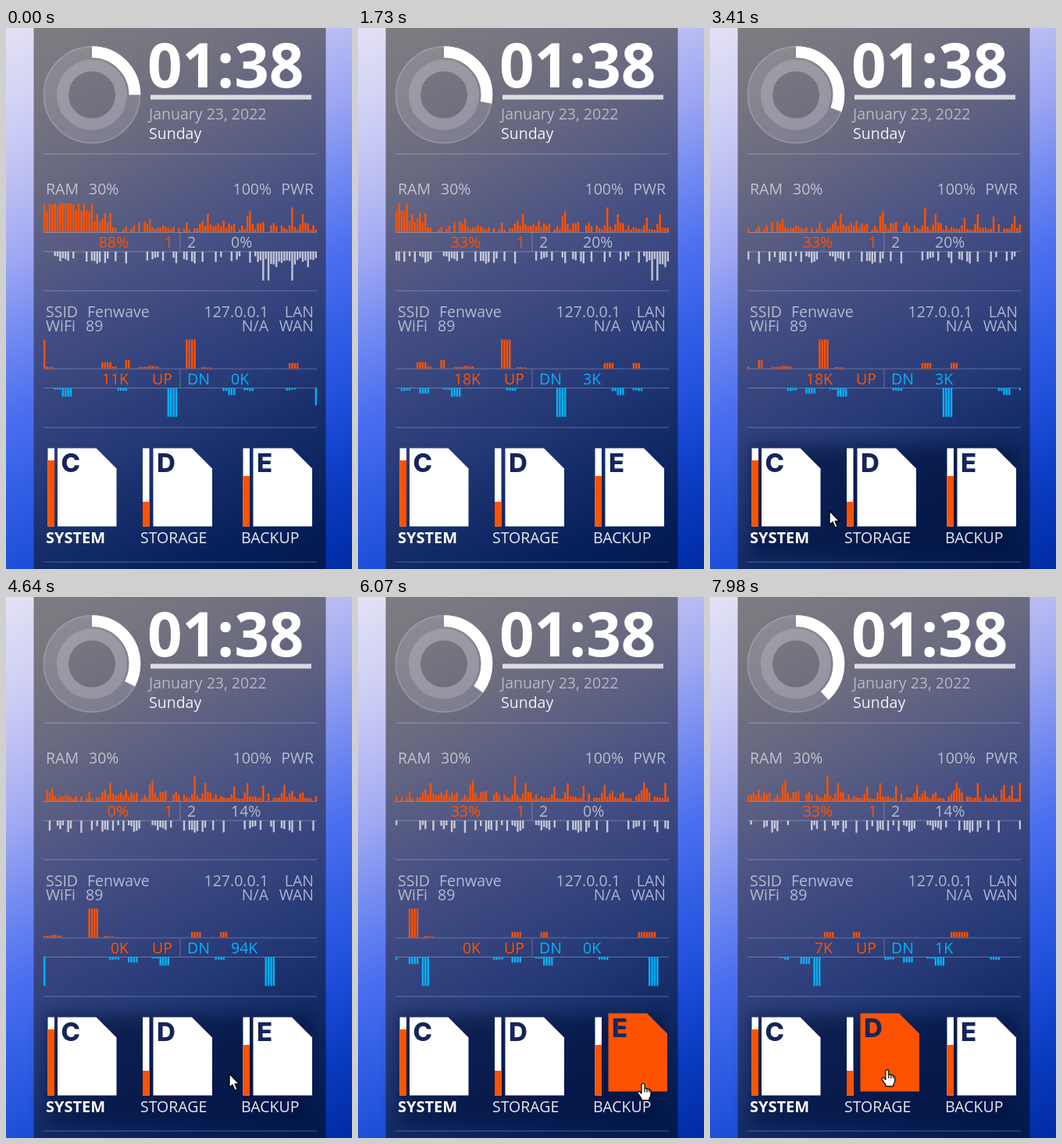
Recreate the animation shown at these times as an HTML page with a canvas. Size 443 px wide and 692 px high, loop 8000 ms.

```html
<!DOCTYPE html>
<html lang="en">
<head>
<meta charset="utf-8">
<title>Desktop panel</title>
<style>
html, body { margin: 0; width: 100%; height: 100%; overflow: hidden; background: #4a6cf0; }
canvas { display: block; width: 443px; height: 692px; }
</style>
</head>
<body>
<canvas id="stage" width="443" height="692"></canvas>
<script>
const W = 443, H = 692, LOOP = 8000;
const ctx = document.getElementById('stage').getContext('2d');
const ORANGE = '#ff5200', CYAN = '#06b2f5';
const SOFT = 'rgba(255,255,255,.6)', BRIGHT = 'rgba(255,255,255,.9)', LINE = 'rgba(255,255,255,.27)';
const FONT = '"Open Sans", "Noto Sans", sans-serif';

// Graph layout: bars move one slot per tick.
const LEFT = 48, PITCH = 3.375, COUNT = 104, TICK = 124.5, PHASE = 62, TALL = 37;

const rnd = (n, seed) => {
  const v = Math.sin(n * 127.1 + seed * 311.7) * 43758.5453;
  return v - Math.floor(v);
};

// Busy at first, then a low floor with rare spikes.
function coreOne(n) {
  const r = rnd(n, 1);
  if (n < 24) return Math.min(TALL, (n < 19 ? 25 : 11) + 16 * r);
  const spike = rnd(n, 4) < .13 ? 8 + 13 * rnd(n, 6) : 0;
  return r < .08 ? 0 : 3 + 10 * r * r + spike;
}
// Small groups with gaps, dense at the far right.
function coreTwo(n) {
  const r = rnd(n, 2);
  if (n > 81) return rnd(n, 7) < .15 ? TALL : 8 + 12 * r;
  const gap = rnd(Math.floor(n / 4), 5) < .6 ? .4 : .8;
  return r < gap ? 0 : 5 + 11 * rnd(n, 3);
}

// Network traffic: a few bursts [x, bars, height] over small random blips.
function traffic(bursts, seed) {
  return n => {
    const x = LEFT + n * PITCH;
    const hit = bursts.find(([from, bars]) => x > from - 1.7 && x < from + bars * PITCH - 1.7);
    if (hit) return hit[2];
    return rnd(Math.floor(n / 4), seed) < .22 ? 1 + 3 * rnd(Math.floor(n / 2), seed + 1) : 0;
  };
}
const upload = traffic([[48, 1, TALL], [123, 4, 8], [153, 2, 11], [229, 4, TALL],
  [363, 4, 7], [399, 3, 7], [523, 7, 7]], 21);
const download = traffic([[-101, 4, 9], [-84, 3, TALL], [30, 4, 7], [70, 4, 11],
  [205, 4, TALL], [284, 3, 9], [397, 1, 22]], 31);

// Readouts take the next value on every tick.
const cycle = (list, step) => list[step % list.length];
const readouts = {
  one: [88, 33, 14, 50, 0, 25, 33, 100, 50, 20, 33, 0, 33],
  two: [0, 20, 14, 33, 0, 14, 0, 25, 33, 20, 0, 14, 14],
  up: [11, 18, 0, 1, 0, 3, 0, 3, 1, 0, 0, 0, 7],
  down: [0, 3, 0, 1, 0, 0, 2, 0, 1, 0, 0, 94, 1]
};

// Pointer path: time, x, y.
const path = [[2250, 47, 696], [2450, 54, 668], [3410, 153, 618], [4640, 286, 610],
  [6070, 365, 622], [6500, 368, 629], [8000, 225, 604]];
function pointerAt(t) {
  if (t < path[0][0]) return null;
  const i = path.findIndex(p => p[0] > t);
  const [t0, x0, y0] = path[i - 1], [t1, x1, y1] = path[i];
  const k = (t - t0) / (t1 - t0);
  return { x: x0 + (x1 - x0) * k, y: y0 + (y1 - y0) * k };
}

const drives = [
  { letter: 'C', bar: 53.5, x: 66, level: 553, label: 'SYSTEM', lx: 51, bold: true },
  { letter: 'D', bar: 175, x: 188.5, level: 606, label: 'STORAGE', lx: 172 },
  { letter: 'E', bar: 303.5, x: 316.5, level: 573, label: 'BACKUP', lx: 301 }
];
const FILE_W = 75.5, FILE_H = 100, CUT = 26;

function rect(x, y, w, h, fill) {
  ctx.fillStyle = fill;
  ctx.fillRect(x, y, w, h);
}
function text(str, x, y, fill = SOFT, align = 'left', font = '19.5px ' + FONT) {
  ctx.font = font;
  ctx.textAlign = align;
  ctx.fillStyle = fill;
  ctx.fillText(str, x, y);
}
const textRight = (str, x, y, fill = SOFT) => text(str, x, y, fill, 'right');
function poly(points, fill) {
  ctx.beginPath();
  points.forEach(([x, y]) => ctx.lineTo(x, y));
  ctx.closePath();
  ctx.fillStyle = fill;
  ctx.fill();
}

// Diagonal gradient whose value grows as y + x / 2.
function slant(colors) {
  const g = ctx.createLinearGradient(0, 0, 361.6, 723.2);
  colors.forEach((c, i) => g.addColorStop(i / (colors.length - 1), c));
  return g;
}
const wall = slant(['#e3e1f4', '#d3d3f5', '#bdbff3', '#9ea7f2', '#718af0',
  '#4b6ef0', '#315ee5', '#1d4dd8', '#093abf', '#022ca8']);
const glass = slant(['#817d82', '#787680', '#6c6c80', '#5a5e82', '#475083',
  '#37457e', '#263a77', '#142c68', '#08205a', '#00184e']);

function background(t) {
  rect(0, 0, W, H, wall);
  rect(35.5, 0, 374, H, glass);
  const shade = Math.max(0, Math.min(1, (t - 1900) / 350));
  if (shade) {
    // Only the soft shadow of an off-stage box is seen.
    ctx.save();
    ctx.shadowColor = `rgba(0,16,58,${.6 * shade})`;
    ctx.shadowBlur = 20;
    ctx.shadowOffsetX = 1000;
    rect(52 - 1000, 534, 341, 142, '#000');
    ctx.restore();
  }
  for (const y of [161, 336, 511, 683]) rect(48, y - .5, 350, 1, LINE);
}

function ring(inner, outer, from, to, color) {
  ctx.beginPath();
  ctx.arc(110, 85.5, (inner + outer) / 2, from, to);
  ctx.lineWidth = outer - inner;
  ctx.strokeStyle = color;
  ctx.stroke();
}
function clock(t) {
  const full = Math.PI * 2, top = -Math.PI / 2;
  ring(30, 45, 0, full, 'rgba(255,255,255,.27)');
  ring(45, 62, 0, full, 'rgba(255,255,255,.12)');
  ring(60.5, 62.5, 0, full, 'rgba(255,255,255,.16)');
  ring(47.5, 62.3, top, top + full * (15 + t / 1000) / 60, '#fff');
  text('01:38', 181, 75.5, '#fff', 'left', 'bold 78px ' + FONT);
  rect(185, 85.5, 206, 6, 'rgba(255,255,255,.76)');
  text('January 23, 2022', 183, 117, 'rgba(255,255,255,.53)');
  text('Sunday', 183, 142, BRIGHT);
}

// dir 1 scrolls right and hangs down, dir -1 scrolls left and stands up.
function graph(step, height, base, dir, color) {
  for (let i = 0; i < COUNT; i++) {
    const h = height(i - dir * step);
    rect(LEFT + i * PITCH, dir > 0 ? base : base - h, 2.4, h, color);
  }
}
function axes(upper, lower) {
  rect(48, upper, 350, 1, LINE);
  rect(48, lower, 350, 1, LINE);
  rect(222.5, upper + 1, 1, lower - upper - 1, LINE);
}

function cpu(step) {
  text('RAM', 51, 213);
  text('30%', 106, 213);
  textRight('100%', 340, 213);
  textRight('PWR', 394, 213);
  axes(261, 285.5);
  graph(step, coreOne, 261, -1, ORANGE);
  graph(step, coreTwo, 286, 1, 'rgba(255,255,255,.68)');
  textRight(cycle(readouts.one, step) + '%', 157, 281, ORANGE);
  textRight('1', 214, 281, ORANGE);
  text('2', 232, 281);
  text(cycle(readouts.two, step) + '%', 288, 281);
}

function network(step) {
  text('SSID', 51, 370);
  text('Fenwave', 104, 370);
  textRight('127.0.0.1', 336, 370);
  textRight('LAN', 394, 370);
  text('WiFi', 51, 388);
  text('89', 102, 388);
  textRight('N/A', 336, 388);
  textRight('WAN', 394, 388);
  axes(435.5, 460);
  graph(step, upload, 435.5, -1, ORANGE);
  graph(step, download, 460.5, 1, CYAN);
  textRight(cycle(readouts.up, step) + 'K', 157, 456, ORANGE);
  textRight('UP', 213, 456, ORANGE);
  text('DN', 232, 456, CYAN);
  text(cycle(readouts.down, step) + 'K', 288, 456, CYAN);
}

const over = (d, p) => p && p.x >= d.bar && p.x <= d.x + FILE_W && p.y > 537 && p.y < 637;

function drive(d, hot) {
  rect(d.bar, 537.5, 8.5, FILE_H, '#fff');
  rect(d.bar, d.level, 8.5, 637.5 - d.level, ORANGE);
  const x = d.x + (hot ? 4 : 0), y = hot ? 532.5 : 537.5, right = x + FILE_W;
  poly([[x, y], [right - CUT, y], [right, y + CUT], [right, y + FILE_H], [x, y + FILE_H]],
    hot ? ORANGE : '#fff');
  text(d.letter, x + 4.5, y + 30.5, '#14265a', 'left', '800 33px Inter, Roboto, sans-serif');
  text(d.label, d.lx, 659, d.bold ? '#fff' : BRIGHT, 'left', (d.bold ? 'bold 20px ' : '19.5px ') + FONT);
}

const arrowShape = new Path2D('M0 0V17.5L4 13.8L7 21L10 19.7L7 12.8H12.5Z');
const handShape = new Path2D('M-2 1.5Q0 -1 2 1.5V7Q4 5.5 5 7.5Q7 6.5 8 8.5Q10 8 10 10.5V14' +
  'Q10 17 8 19V21.5H-2V19.5L-6.5 13Q-7.5 10 -4.5 10.5L-2 13Z');
function pointer(p, hand) {
  ctx.save();
  ctx.translate(p.x, p.y);
  const shape = hand ? handShape : arrowShape;
  ctx.lineJoin = 'round';
  ctx.lineWidth = 1.2;
  ctx.fillStyle = '#fff';
  ctx.strokeStyle = '#000';
  ctx.fill(shape);
  ctx.stroke(shape);
  if (hand) {
    ctx.beginPath();
    for (const x of [2, 5, 8]) {
      ctx.moveTo(x, 7.5);
      ctx.lineTo(x, 11.5);
    }
    ctx.stroke();
  }
  ctx.restore();
}

function draw(t) {
  const step = Math.floor((t + PHASE) / TICK), p = pointerAt(t);
  background(t);
  clock(t);
  cpu(step);
  network(step);
  drives.forEach(d => drive(d, over(d, p)));
  if (p) pointer(p, drives.some(d => over(d, p)));
}

const start = performance.now();
function frame() {
  draw((performance.now() - start) % LOOP);
  requestAnimationFrame(frame);
}
frame();
</script>
</body>
</html>
```
